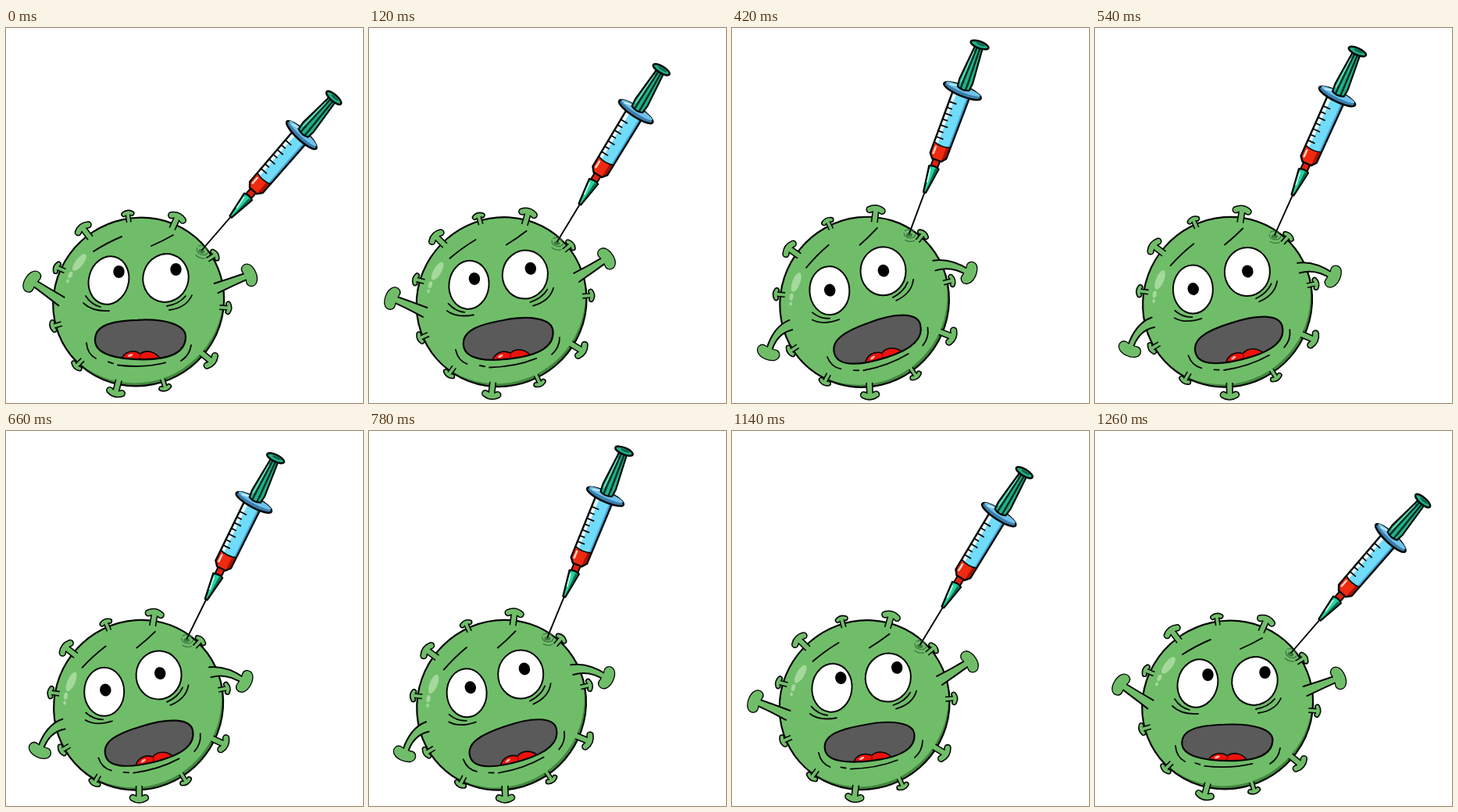
Write an HTML page with a canvas that moves like this. It is 457 by 480 pixels and loops after 1320 ms.

```html
<!DOCTYPE html>
<html lang="en">
<head>
<meta charset="utf-8">
<title>Vaccinated virus</title>
<style>
  html, body { margin: 0; width: 100%; height: 100%; overflow: hidden; background: #fff; }
  canvas { display: block; width: 457px; height: 480px; }
</style>
</head>
<body>
<canvas id="stage"></canvas>
<script>
const W = 457, H = 480, STEP = 60, COUNT = 22;
const RAD = Math.PI / 180;
const INK = '#050805', GREEN = '#70bd69', SHADE = '#43883f', TEAL = '#1fb088';
const HUB = { x: 170.5, y: 351 };
const TIP = { x: 251, y: 284 };

const canvas = document.getElementById('stage');
const ctx = canvas.getContext('2d');
const dpr = window.devicePixelRatio || 1;
canvas.width = W * dpr;
canvas.height = H * dpr;

const clamp = (v, lo = 0, hi = 1) => Math.min(hi, Math.max(lo, v));
const smooth = v => { v = clamp(v); return v * v * (3 - 2 * v); };

// The swing runs forward, then back; only the gaze and mouth are not mirrored.
function pose(k) {
  const d = Math.min(k, COUNT - 1 - k);
  const droop = smooth((d - 1.5) / 4);
  return {
    body: -4 * Math.min(d, 4.85) + Math.max(0, d - 5.2),
    needle: -4.85 * Math.min(d, 4.8) + 1.9 * Math.max(0, d - 5.5),
    gaze: clamp(Math.max(1 - k / 5.2, (k - 10) / 6), 0.04),
    left: 67 * droop,
    right: 56 * droop - 5 * clamp(d / 2),
    mouthX: 0.5 - k / 8,
    mouthY: 3 * droop,
    open: 1.03 - 0.004 * k
  };
}

function within(draw) {
  ctx.save();
  draw();
  ctx.restore();
}

function paint(path, fill, line, width) {
  if (fill) { ctx.fillStyle = fill; ctx.fill(path); }
  if (line) { ctx.strokeStyle = line; ctx.lineWidth = width; ctx.stroke(path); }
}

const shape = (d, fill, line, width = 2) => paint(new Path2D(d), fill, line, width);

function oval(x, y, rx, ry, turn, fill, line, width = 2) {
  const p = new Path2D();
  p.ellipse(x, y, rx, ry, turn * RAD, 0, 7);
  paint(p, fill, line, width);
  return p;
}

// Eleven spikes, nearly evenly spread; four of them are large.
function spike(i) {
  const big = [1, 3, 6, 8].includes(i);
  const s = big ? 1 : 0.64, dist = big ? 120 : 115;
  const angle = -160 + i * 360 / 11 - 4 * Math.cos((i - 3) * Math.PI / 4);
  within(() => {
    ctx.translate(HUB.x, HUB.y);
    ctx.rotate(angle * RAD);
    ctx.translate(dist, 0);
    ctx.scale(s, s);
    const stalk = from => `M${(from - dist) / s} 0H0`;
    const cap = 'M-1.5 -8Q3.5 0 -1.5 8';
    const edge = 3.2 / s;
    ctx.lineCap = 'round';
    shape(cap, null, INK, 6.3 + edge);
    ctx.lineCap = 'butt';
    shape(stalk(103), null, INK, 6 + edge);
    shape(stalk(101), null, GREEN, 6);
    ctx.lineCap = 'round';
    shape(cap, null, GREEN, 6.3);
  });
}

// A tapered limb along x, curling by `bend` degrees, with a flat hand.
function arm(x, y, dir, bend) {
  within(() => {
    ctx.translate(x, y);
    ctx.rotate(dir * RAD);
    const polar = (r, deg) => [r * Math.cos(deg * RAD), r * Math.sin(deg * RAD)];
    const [ex, ey] = polar(45, bend);
    const joint = (r, deg, half) => {
      const [px, py] = polar(r, deg), [nx, ny] = polar(half, deg + 90);
      return [px + nx, py + ny];
    };
    const side = f => [joint(0, bend / 2, 6.5 * f), joint(22, bend / 2, 5 * f), joint(45, bend, 4 * f)];
    const [a, b] = [side(-1), side(1)];
    const hand = line => within(() => {
      ctx.translate(ex, ey);
      ctx.rotate(bend * 1.25 * RAD);
      shape('M-5 -5C-8 -14 2 -17 6 -11C10 -5 10 6 6 11C2 17 -8 14 -5 5', GREEN, line, 2.6);
    });
    hand(INK);
    shape(`M${a[0]}Q${a[1]} ${a[2]}L${b[2]}Q${b[1]} ${b[0]}Z`, GREEN);
    shape(`M${a[0]}Q${a[1]} ${a[2]}M${b[0]}Q${b[1]} ${b[2]}`, null, INK, 2);
    hand();
  });
}

function eye(x, y, rx, ry, turn, gaze) {
  oval(x, y, rx, ry, turn, '#fff', INK, 2);
  oval(x + 13 * gaze, y - 11 * gaze, 7.2, 8, 0, '#000');
}

function mouth(p) {
  within(() => {
    ctx.translate(171.5 + p.mouthX, 398.5 + p.mouthY);
    ctx.scale(1, p.open);
    const lips = 'M-58 2C-59 -18 -36 -23 -4 -24C32 -26 59 -18 58 -2C57 16 38 25 4 25C-32 25 -57 18 -58 2Z';
    shape(lips, '#5a5a5a');
    within(() => {
      ctx.clip(new Path2D(lips));
      shape('M-25 26C-20 13 -7 13 0 18C8 12 21 15 27 27Z', '#ed120c', INK, 1.6);
      shape('M0 18Q1 22 -2 25', null, '#8d0805', 1.3);
      oval(-13, 20, 3.5, 1.5, -20, '#ffb8ad');
    });
    shape(lips, null, INK, 2.2);
    shape('M-41 28L-35 30M-29 32Q4 36 32 29', null, INK, 1.9);
  });
  shape('M103 403Q104 417 115 423M237 406Q235 419 224 426', null, INK, 1.8);
}

function virus(p) {
  const [bx, by, rx, ry, tilt] = [169.7, 350.5, 110.5, 106.8, -33];
  within(() => {
    ctx.clip(oval(bx, by, rx, ry, tilt, SHADE));
    oval(bx - 2, by - 5, rx + 1, ry + 1, tilt, GREEN);
  });
  oval(bx, by, rx, ry, tilt, null, INK, 2.2);
  for (let i = 0; i < 11; i++) spike(i);
  arm(71, 350, 180 + 34, -p.left);
  arm(269, 333, -21.6, p.right);

  oval(94, 300, 5, 13, 38, '#a5d99c');
  oval(82.5, 316, 2.5, 4.5, 25, '#a5d99c');
  oval(79, 324, 1.7, 2.5, 15, '#a5d99c');
  shape('M112 286Q129 275 148 267M186 279Q200 273 214 265', null, INK, 1.9);
  eye(131.5, 323, 25.5, 31, 15, p.gaze);
  eye(204.5, 320, 29, 31, 18, p.gaze);
  shape('M99 352Q110 363 132 362M102 343Q109 354 121 357', null, INK, 1.8);
  shape('M238 342Q231 358 209 361M230 343Q222 353 206 356', null, INK, 1.8);
  mouth(p);

  within(() => {
    ctx.translate(TIP.x, TIP.y);
    ctx.rotate(20 * RAD);
    oval(0, 2, 4, 2.5, 0, '#3d7a40');
    shape('M-7 0Q-6 6 1 6Q7 6 8 1M-6 -3Q0 -7 6 -3M-5 9Q1 12 7 9', null, '#397440', 1.2);
  });
}

function syringe() {
  shape('M0 0V-57', null, '#000', 1.9);

  // plunger
  const rod = 'M-8 -198L-9 -208L-5 -255H5L9 -208L8 -198';
  shape(rod, TEAL);
  shape('M-3.5 -198L-2 -252M3.5 -198L2 -252', null, '#052e23', 2.4);
  shape('M-6 -204L-4 -246', null, '#7fe3c0', 1.3);

  // barrel
  shape('M-11 -118L-11.5 -194H11.5L11 -118Z', '#70dcfa');
  shape('M8 -118V-194H11.5L11 -118Z', '#46a9da');
  shape('M-8 -121V-187', null, '#f2fdff', 4);
  shape('M-11 -121V-106L-6 -100H6L11 -106V-121Q0 -117 -11 -121Z', '#ee2a10');
  shape('M6 -119V-100L11 -106V-121Z', '#a91206');
  shape('M-7 -116V-107', null, '#ffd3c8', 2.5);
  shape('M-11 -121Q0 -117 11 -121', null, INK, 1.6);
  shape('M-11.5 -194L-11 -106L-6 -100H6L11 -106L11.5 -194', null, INK, 2.4);
  for (let i = 0; i < 7; i++) {
    shape(`M-11 ${-128 - i * 8}h${i % 2 ? 6 : 9}`, null, INK, 1.8);
  }

  // neck and hub
  shape('M-4.5 -100V-90H4.5V-100Z', '#e0220e', INK, 2);
  shape('M-6.5 -90L-1.5 -56H1.5L6.5 -90Q0 -93 -6.5 -90Z', '#23d3a0', INK, 2.4);
  shape('M2 -89L1 -60L5.5 -89Z', '#0b6a50');
  shape('M-3.5 -86L-1.5 -70', null, '#c4f9e6', 1.8);

  // flange, with the rod standing on it
  oval(0, -194.5, 25.5, 6.5, 2, '#3a80b0', INK, 2.6);
  oval(0, -197, 23.5, 3.8, 2, '#70c2ea');
  shape('M-18 -197Q-10 -199.5 -2 -199', null, '#d4f3ff', 1.6);
  shape('M-8 -198L-8.5 -204H8.5L8 -198Q0 -194 -8 -198Z', TEAL);
  shape('M-3.3 -197V-206M3.3 -197V-206', null, '#052e23', 2.4);
  shape(rod + 'Q0 -194 -8 -198', null, INK, 2.2);
  oval(0, -257.5, 12, 4.3, 0, TEAL, INK, 2.5);
  oval(1, -258.5, 6, 1.4, 0, '#0c5e48');
}

function draw(k) {
  ctx.setTransform(dpr, 0, 0, dpr, 0, 0);
  ctx.fillStyle = '#fff';
  ctx.fillRect(0, 0, W, H);
  ctx.lineCap = ctx.lineJoin = 'round';

  const p = pose(k);
  within(() => {
    ctx.translate(HUB.x, HUB.y);
    ctx.rotate(p.body * RAD);
    ctx.translate(-HUB.x, -HUB.y);
    virus(p);
    // The needle stays stuck in the skin but tilts on its own.
    ctx.translate(TIP.x, TIP.y);
    ctx.rotate((40.9 + p.needle - p.body) * RAD);
    syringe();
  });
}

const start = performance.now();
function tick() {
  const t = Math.max(0, performance.now() - start);
  draw(Math.floor(t / STEP) % COUNT);
  requestAnimationFrame(tick);
}
tick();
</script>
</body>
</html>
```
